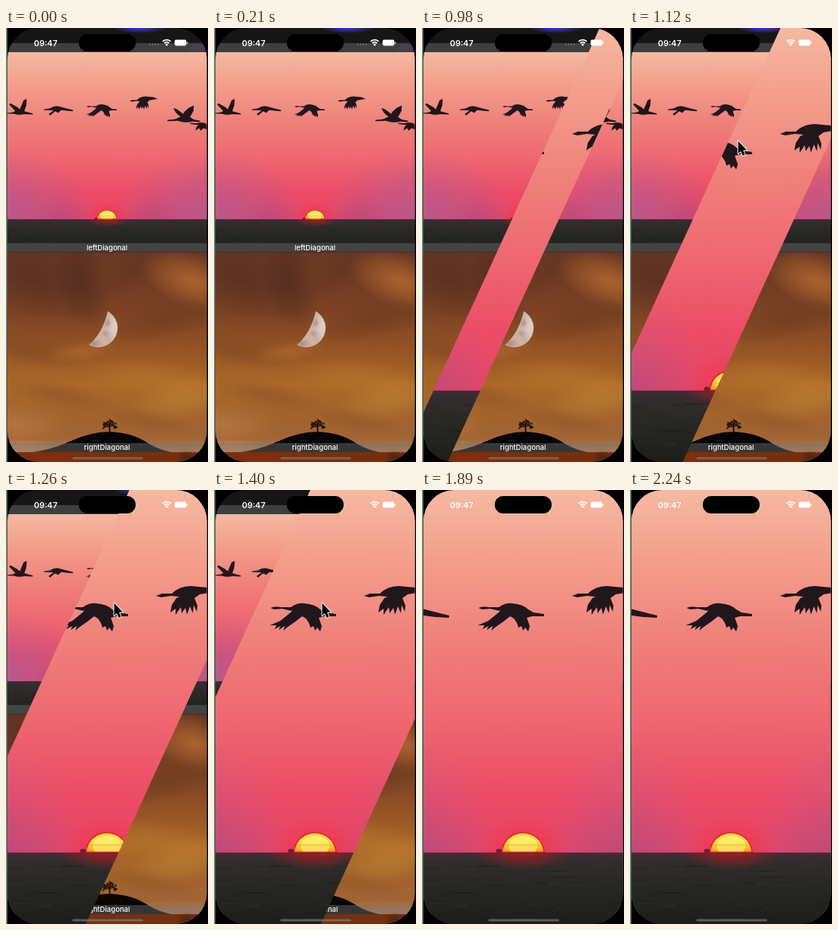
An HTML page with a canvas that plays this animation: 268x574 px, repeating every 2.38 s.

```html
<!DOCTYPE html>
<html lang="en">
<head>
<meta charset="utf-8">
<title>Diagonal transition</title>
<style>
html, body { margin: 0; width: 100%; height: 100%; overflow: hidden; background: #000; }
canvas { display: block; width: 268px; height: 574px; }
</style>
</head>
<body>
<canvas id="stage" width="268" height="574"></canvas>
<script>
const ctx = document.getElementById('stage').getContext('2d');
const W = 268, H = 574, LOOP = 2380, STEP = 70;
const FONT = 'Inter, "Liberation Sans", sans-serif';
const TOP = 32, CELL = 264.5, HORIZON = 480;

const BIRDS = [
  'M-154 174L-140 173L-130 169L-148 150L-143 147L-124 158L-117 164L-106 138L-98 134Q-95 150-104 169L-80 176L-80 179L-104 178Q-120 182-134 177L-154 176Z',
  'M-48 164L-30 161Q-14 150 4 158L36 166L36 169L18 168L2 166L-6 174L-16 170L-30 182L-34 178L-20 167L-48 166Z',
  'M75 156Q81 153 88 155L102 155Q110 149 120 150Q134 151 141 158L148 162L162 164L162 167L146 167L139 169L143 180L141 187L137 182L134 186L132 180L128 182L126 176L122 170L117 167L108 174L98 181L92 186L94 180L86 185L88 180L80 184L83 179L74 179L88 173L98 165L104 160L90 157L80 158Z',
  'M199 140L207 137L220 137Q230 127 245 127L268 129L280 134L268 136L257 138L250 143L254 153L253 161L249 152L248 163L244 154L240 165L238 156L233 163L232 155L225 165L225 157L218 162L220 152L226 143L230 141L219 140L206 142Z',
  'M308 195L330 192L346 185Q331 176 325 160L336 164L353 177Q362 161 384 153L383 168L373 186L384 193L403 197L400 200L380 199Q358 204 338 197L308 198Z',
  'M374 203L392 204Q410 199 420 206L423 222L412 218L404 225L399 218L388 225L392 214L397 209L374 206Z'
].map(d => new Path2D(d));
const HILL = new Path2D('M36 561Q62 557 84 547Q112 534 138 534Q168 535 190 550Q204 558 219 561Z');
const MOON = new Path2D('M135 374.5A25.4 25.4 0 0 1 110 419Q128 404 135 374.5Z');
const POINTER = new Path2D('M143.5 149.5L143.5 166L147 163L149.6 169L152.6 167.8L150 161.8L155 161.5Z');

function seeded(seed) {
  return () => (seed = (seed * 16807) % 2147483647) / 2147483647;
}

function rect(x, y, w, h, fill) {
  ctx.fillStyle = fill;
  ctx.fillRect(x, y, w, h);
}

function pill(x, y, w, h, r, fill) {
  ctx.fillStyle = fill;
  ctx.beginPath();
  ctx.roundRect(x, y, w, h, r);
  ctx.fill();
}

function oval(x, y, rx, ry, fill) {
  ctx.fillStyle = fill;
  ctx.beginPath();
  ctx.ellipse(x, y, rx, ry, 0, 0, 7);
  ctx.fill();
}

function shade(y0, y1, stops) {
  const g = ctx.createLinearGradient(0, y0, 0, y1);
  stops.forEach(([at, color]) => g.addColorStop(at, color));
  return g;
}

// Soft elliptical spot; rgb is a "r,g,b" string
function spot(x, y, rx, ry, rgb, alpha, turn = 0) {
  ctx.save();
  ctx.translate(x, y);
  ctx.rotate(turn);
  ctx.scale(rx, ry);
  const g = ctx.createRadialGradient(0, 0, 0, 0, 0, 1);
  g.addColorStop(0, `rgba(${rgb},${alpha})`);
  g.addColorStop(0.5, `rgba(${rgb},${alpha * 0.55})`);
  g.addColorStop(1, `rgba(${rgb},0)`);
  rect(-1, -1, 2, 2, g);
  ctx.restore();
}

function clipRect(x, y, w, h, draw) {
  ctx.save();
  ctx.beginPath();
  ctx.rect(x, y, w, h);
  ctx.clip();
  draw();
  ctx.restore();
}

function sunset() {
  const left = -160, wide = 590;
  rect(left, 0, wide, HORIZON, shade(0, HORIZON, [
    [0, '#f5b9a1'], [0.2, '#f39d8b'], [0.42, '#ef807a'],
    [0.63, '#ee6871'], [0.84, '#ec4c66'], [1, '#e64566']
  ]));
  clipRect(left, 0, wide, HORIZON, () => {
    for (const side of [-1, 1]) {
      spot(134 + side * 300, 470, 270, 190, '160,98,160', 0.65);
      spot(134 + side * 130, 478, 90, 70, '140,65,125', 0.25);
    }
    spot(134, 478, 62, 50, '245,45,70', 0.7);
  });
  rect(left, HORIZON, wide, H - HORIZON, shade(HORIZON, H, [
    [0, '#3f2c34'], [0.1, '#322d2e'], [0.5, '#272722'], [1, '#1d1e1a']
  ]));
  const rnd = seeded(11);
  for (let i = 0; i < 90; i++) {
    const tone = i % 2 ? 'rgba(75,72,65,.22)' : 'rgba(10,10,8,.25)';
    rect(left + rnd() * wide, HORIZON + 4 + rnd() * 75, 8 + rnd() * 28, 1.2, tone);
  }
  clipRect(left, HORIZON, wide, 40, () => spot(134, HORIZON, 66, 21, '190,25,32', 0.75));

  clipRect(left, 0, wide, HORIZON, () => {
    oval(134, 480, 29, 28, '#d92f32');
    oval(134, 480, 27, 26, shade(454, 480, [[0, '#ffd43c'], [0.4, '#ffde48'], [0.75, '#fbb62f'], [1, '#f0851f']]));
    oval(134, 471, 19, 14, 'rgba(255,245,120,.65)');
    rect(112, 469, 44, 1.2, 'rgba(235,160,40,.6)');
  });
  rect(left, HORIZON - 0.6, wide, 1.2, 'rgba(75,35,50,.7)');
  rect(104, HORIZON - 1.5, 60, 2, '#a31d25');
  oval(102, 477.5, 4, 3, '#701f32');
  ctx.fillStyle = '#21161c';
  BIRDS.forEach(b => ctx.fill(b));
}

function moonlight() {
  rect(0, 296, W, CELL + 1, shade(296, 561, [
    [0, '#683723'], [0.3, '#7c4223'], [0.52, '#985725'],
    [0.66, '#ab692a'], [0.8, '#a3632a'], [0.93, '#a06436'], [1, '#b98252']
  ]));
  spot(40, 335, 95, 50, '78,42,32', 0.6, 0.3);
  spot(100, 335, 35, 65, '70,37,31', 0.55, -0.2);
  spot(165, 325, 60, 24, '95,50,33', 0.5, -0.6);
  spot(250, 335, 75, 36, '188,112,48', 0.75, 0.35);
  spot(215, 385, 85, 26, '108,60,32', 0.65, -0.25);
  spot(30, 425, 75, 22, '125,68,35', 0.5, 0.2);
  spot(100, 428, 50, 14, '178,112,48', 0.55, -0.15);
  spot(190, 462, 95, 26, '188,120,42', 0.5, 0.1);
  spot(235, 490, 75, 30, '194,135,52', 0.55, -0.2);
  spot(70, 485, 80, 18, '136,76,36', 0.5, 0.2);
  spot(190, 520, 65, 16, '138,84,36', 0.5, 0.15);
  spot(10, 525, 75, 30, '195,126,78', 0.55);
  spot(15, 557, 75, 13, '225,165,115', 0.6);
  spot(255, 557, 55, 11, '195,130,80', 0.45);

  ctx.fillStyle = '#cbb0a4';
  ctx.fill(MOON);
  ctx.save();
  ctx.clip(MOON);
  spot(146, 395, 14, 24, '236,218,209', 0.8);
  spot(135, 390, 5, 7, '151,122,115', 0.6);
  spot(132, 404, 6, 5, '155,124,115', 0.5);
  spot(116, 417, 12, 6, '145,105,92', 0.5);
  ctx.restore();

  ctx.fillStyle = '#080605';
  ctx.fill(HILL);
  rect(136.6, 524, 1.8, 12, '#1c0e09');
  const rnd = seeded(5);
  for (let i = 0; i < 46; i++) {
    const a = Math.PI * (1 + rnd()), r = Math.sqrt(rnd());
    oval(137.5 + Math.cos(a) * r * 10.5, 529.5 + Math.sin(a) * r * 11.5, 1.4, 1.1, '#2b150c');
  }
}

function label(text, y) {
  rect(0, y, W, 12, 'rgba(112,112,112,.45)');
  if (!text) return;
  ctx.font = `500 9.5px ${FONT}`;
  ctx.textAlign = 'center';
  ctx.fillStyle = '#fff';
  ctx.fillText(text, 134, y + 9.4);
}

function status() {
  ctx.font = `600 10.9px ${FONT}`;
  ctx.textAlign = 'left';
  ctx.fillStyle = '#fff';
  ctx.fillText('09:47', 37, 23.8);
  ctx.strokeStyle = '#fff';
  ctx.lineWidth = 1.7;
  for (const r of [4.6, 7.7]) {
    ctx.beginPath();
    ctx.arc(213.2, 23.3, r, -Math.PI * 0.75, -Math.PI * 0.25);
    ctx.stroke();
  }
  ctx.beginPath();
  ctx.moveTo(213.2, 24);
  ctx.arc(213.2, 23.5, 2.8, -Math.PI * 0.75, -Math.PI * 0.25);
  ctx.fill();
  pill(223.6, 15.6, 15.8, 7.8, 2.4, '#fff');
  pill(240, 18, 1.2, 3.2, 0.6, 'rgba(255,255,255,.7)');
}

function list() {
  rect(0, 0, W, TOP, '#161616');
  spot(178, 0, 36, 7, '70,55,225', 0.9);
  spot(252, 26, 16, 10, '85,35,95', 0.4);
  label('', TOP - 12);
  clipRect(0, TOP, W, CELL, () => {
    const k = CELL / H;
    ctx.translate(134, TOP);
    ctx.scale(k, k);
    ctx.translate(-134, 0);
    sunset();
  });
  label('leftDiagonal', TOP + CELL - 12);
  clipRect(0, TOP + CELL, W, CELL, moonlight);
  label('rightDiagonal', TOP + 2 * CELL - 12);
  rect(0, TOP + 2 * CELL, W, 13, '#76300f');
  spot(75, 567, 60, 12, '140,42,10', 0.5);
  spot(240, 568, 14, 10, '45,24,17', 0.5);
  for (let i = 0; i < 4; i++) pill(190 + i * 3.6, 21, 2, 2, 1, '#777');
}

function pointer() {
  ctx.lineJoin = 'round';
  ctx.lineWidth = 2;
  ctx.strokeStyle = '#fff';
  ctx.stroke(POINTER);
  ctx.fillStyle = '#000';
  ctx.fill(POINTER);
}

function draw(time) {
  const t = Math.floor((time % LOOP) / STEP + 1e-6) * STEP;
  rect(0, 0, W, H, '#000');
  rect(0, 0, 1.6, H, '#789782');
  ctx.save();
  ctx.beginPath();
  ctx.roundRect(2, 0, 264.5, H, 41);
  ctx.clip();
  list();

  const half = (t - 859) * 0.257;
  if (half > 0) {
    const mid = 266.8, lean = 264;
    ctx.save();
    ctx.beginPath();
    ctx.moveTo(mid - half, 0);
    ctx.lineTo(mid + half, 0);
    ctx.lineTo(mid + half - lean, H);
    ctx.lineTo(mid - half - lean, H);
    ctx.clip();
    sunset();
    ctx.restore();
  }
  status();
  pill(88, 567.5, 94, 3, 1.5, 'rgba(125,125,125,.65)');
  ctx.restore();
  pill(96.5, 8, 75.5, 23, 11.5, '#000');
  if (t >= 1050 && t < 1540) pointer();
}

let start;
function tick(now) {
  start ??= now;
  draw(now - start);
  requestAnimationFrame(tick);
}
draw(0);
requestAnimationFrame(tick);
</script>
</body>
</html>
```
